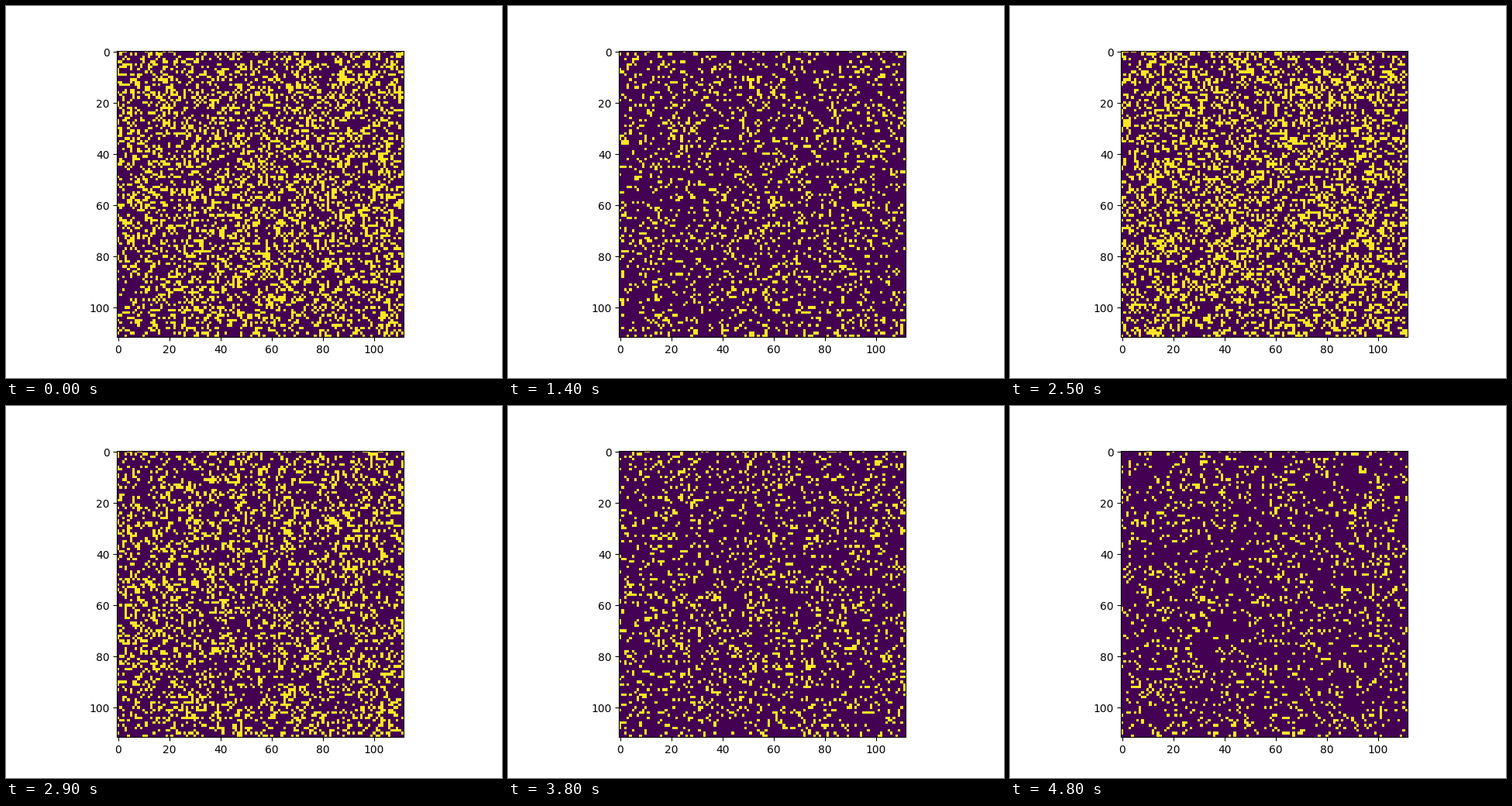
These frames come from a looping animation (640x480 px, 4900 ms). A matplotlib script:

```python
import numpy as np
import matplotlib.pyplot as plt
from matplotlib.animation import FuncAnimation

SIZE = 112
FRAMES = 49
INTERVAL = 100


def pulse(step, peak, height):
    return height * np.exp(-(step - peak) ** 2 / 18)


def density(step):
    """Share of lit cells: a quiet level with three bursts per loop."""
    return (0.125 + pulse(step, 1, 0.185)
            + pulse(step, 21, 0.4) + pulse(step, 32, 0.195))


def cells(step):
    rng = np.random.default_rng(step)
    return rng.random((SIZE, SIZE)) < density(step)


fig, ax = plt.subplots(figsize=(6.4, 4.8), dpi=100)
image = ax.imshow(cells(0).astype(float), cmap="viridis", vmin=0, vmax=1)


def update(step):
    image.set_data(cells(step).astype(float))
    return [image]


anim = FuncAnimation(fig, update, frames=FRAMES, interval=INTERVAL, repeat=True)
plt.show()
```
